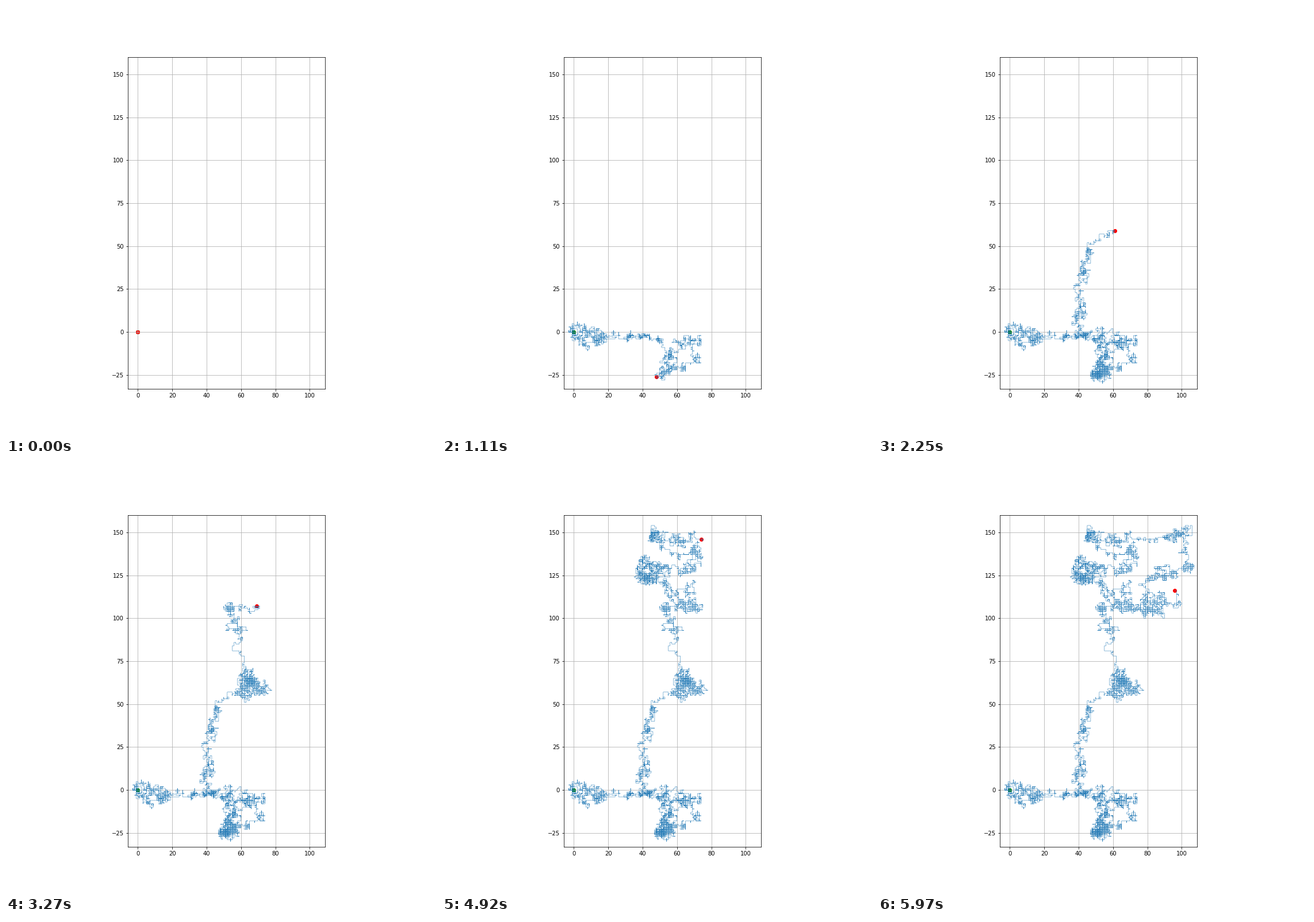
A matplotlib script that plays this animation: 748 px wide and 748 px high, repeating every 6 s.

```python
import numpy as np
import matplotlib.pyplot as plt
from matplotlib.animation import FuncAnimation

FRAMES, STEPS, TRIES = 200, 50, 60
LOW, HIGH = np.array([-4, -31]), np.array([107, 158])
rng = np.random.default_rng(7)

# Main turning points of the walk: frame, x, y.
TURNS = np.array([
    (0, 0, 0), (14, 12, -4), (20, 50, -4), (28, 72, -12), (37, 48, -26),
    (54, 68, -8), (62, 36, 4), (69, 43, 33), (75, 61, 59), (91, 74, 60),
    (100, 60, 80), (106, 53, 105), (109, 69, 107), (121, 51, 121),
    (139, 41, 129), (147, 74, 130), (156, 48, 150), (164, 74, 146),
    (170, 100, 150), (176, 104, 128), (183, 82, 124), (189, 76, 104),
    (199, 96, 116),
])


def shuffled_signs(n, total):
    signs = np.ones(n, int)
    signs[:(n - total) // 2] = -1
    return rng.permutation(signs)


def bridge(a, b, n):
    """Random lattice walk from a to b in n unit steps."""
    dx, dy = b - a
    u = shuffled_signs(n, dx + dy)
    v = shuffled_signs(n, dx - dy)
    return a + np.cumsum(np.column_stack([(u + v) // 2, (u - v) // 2]), axis=0)


def best_bridge(a, b, n):
    """Of several bridges, the one that strays least beyond its ends."""
    margin = np.sqrt(n) / 4
    low = np.maximum(np.minimum(a, b) - margin, LOW)
    high = np.minimum(np.maximum(a, b) + margin, HIGH)

    def stray(path):
        return np.maximum(low - path, 0).sum() + np.maximum(path - high, 0).sum()

    return min((bridge(a, b, n) for _ in range(TRIES)), key=stray)


legs = [best_bridge(p[1:], q[1:], (q[0] - p[0]) * STEPS)
        for p, q in zip(TURNS, TURNS[1:])]
walk = np.vstack([TURNS[:1, 1:], *legs])

fig, ax = plt.subplots(figsize=(748 / 72, 748 / 72), dpi=72)
fig.subplots_adjust(top=0.881)
ax.set_aspect("equal")
ax.set_xlim(LOW[0] - 2, HIGH[0] + 2)
ax.set_ylim(LOW[1] - 2, HIGH[1] + 2)
ax.set_xticks(range(0, 101, 20))
ax.set_yticks(range(-25, 151, 25))
ax.grid(True)

line, = ax.plot([], [], color="tab:blue", lw=0.5)
ax.scatter([0], [0], color="green")
head = ax.scatter([0], [0], color="red")


def update(i):
    path = walk[:i * STEPS + 1]
    line.set_data(path[:, 0], path[:, 1])
    head.set_offsets(path[-1:])
    return line, head


anim = FuncAnimation(fig, update, frames=FRAMES, interval=30,
                     repeat=True, repeat_delay=0)
plt.show()
```
